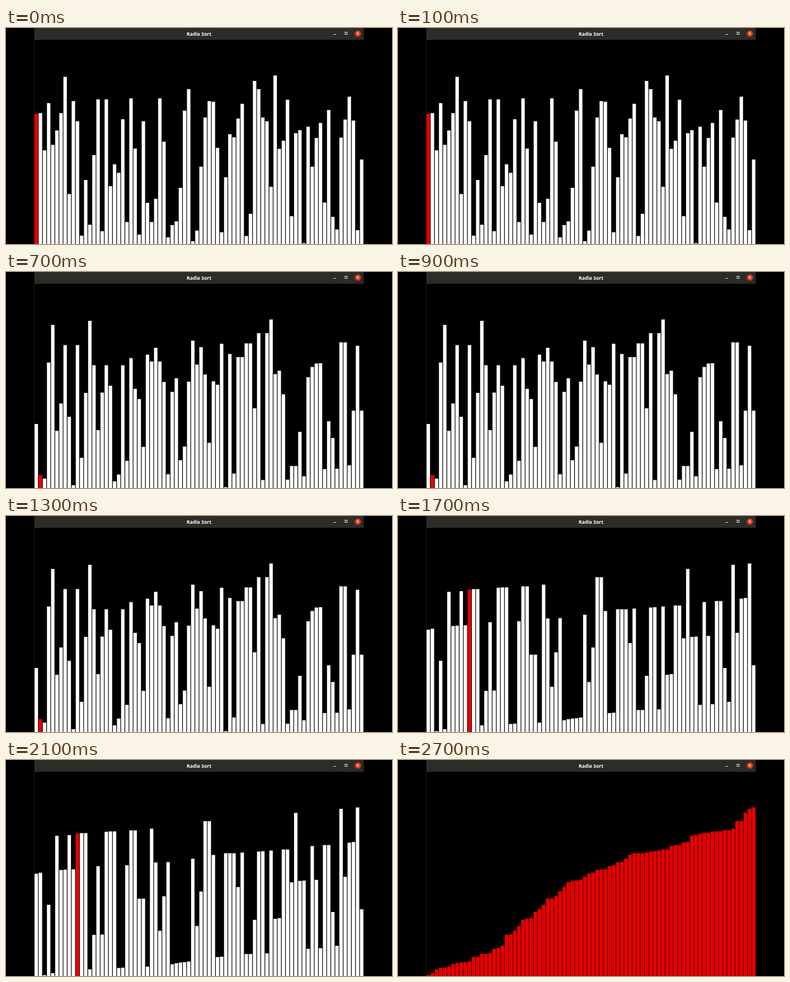
These frames come from a looping animation (690x388 px, 3.3 s). An HTML page with a canvas:

```html
<!DOCTYPE html>
<html lang="en">
<head>
<meta charset="utf-8">
<title>Radix Sort</title>
<style>
  html, body { margin: 0; width: 100%; height: 100%; overflow: hidden; background: #000; }
  canvas { display: block; }
</style>
</head>
<body>
<canvas id="stage" width="690" height="388"></canvas>
<script>
const ctx = document.getElementById('stage').getContext('2d');

const LOOP = 3300;
const SCALE = 0.6135;          // the 960 x 600 window, shrunk to the stage
const LEFT = 50.6, FLOOR = 389.6, TITLE_HEIGHT = 21.3;
const PITCH = 12 * SCALE, BAR_WIDTH = 10 * SCALE;
const WINDOW_WIDTH = 960 * SCALE;
const RED = '#e60000', DARK_RED = '#580000', WHITE = '#fffefc';

// The additive feedback generator behind rand() in the GNU C library.
function randomNumbers(count, seed = 1) {
  const warmup = 344;
  const state = [seed];
  for (let i = 1; i < warmup + count; i++) {
    if (i < 31) state[i] = (16807 * state[i - 1]) % 2147483647;
    else if (i < 34) state[i] = state[i - 31];
    else state[i] = (state[i - 3] + state[i - 31]) >>> 0;
  }
  return state.slice(warmup).map(word => word >>> 1);
}

// One stable pass of the sort, by the digit at the given place.
function sortByDigit(list, place) {
  const digit = v => Math.floor(v / place) % 10;
  return [...list].sort((a, b) => digit(a) - digit(b));
}

const values = randomNumbers(80).map(n => n % 500);
const byUnits = sortByDigit(values, 1);
const byTens = sortByDigit(byUnits, 10);
const sorted = sortByDigit(byTens, 100);

const stages = [
  { start: 0, list: values, isRed: i => i === 0 },
  { start: 700, list: byUnits, isRed: i => i === 1 },
  { start: 1700, list: byTens, isRed: i => i === 10 },
  { start: 2700, list: sorted, isRed: () => true }
];

function rect(color, x, y, w, h) {
  ctx.fillStyle = color;
  ctx.fillRect(x, y, w, h);
}

function drawBar(value, i, red) {
  const height = value * SCALE;
  const x = LEFT + 0.5 + i * PITCH, y = FLOOR - height;
  if (red) {
    const rim = (PITCH - BAR_WIDTH) / 2;
    rect(DARK_RED, x - rim, y - rim, PITCH, height + rim);
  }
  rect(red ? RED : WHITE, x, y, BAR_WIDTH, height);
}

function drawTitleBar() {
  rect('#2c2c28', LEFT, 0, WINDOW_WIDTH, TITLE_HEIGHT);

  ctx.fillStyle = '#fff';
  ctx.font = 'bold 8.6px "Open Sans", "Noto Sans", sans-serif';
  ctx.textAlign = 'center';
  ctx.fillText('Radix Sort', 345, 13.5);

  rect('#d8d8d4', 585, 11, 5, 1);
  ctx.strokeStyle = '#e8e8e4';
  ctx.lineWidth = 1;
  ctx.strokeRect(606, 7.5, 4, 4);

  ctx.fillStyle = '#dc3d1a';
  ctx.beginPath();
  ctx.arc(629, 10, 5.6, 0, Math.PI * 2);
  ctx.fill();
  ctx.strokeStyle = '#fff';
  ctx.beginPath();
  for (const d of [-2, 2]) {
    ctx.moveTo(629 - d, 8);
    ctx.lineTo(629 + d, 12);
  }
  ctx.stroke();
}

function draw(time) {
  const { list, isRed } = stages.findLast(s => time >= s.start);
  rect('#000', 0, 0, 690, 388);
  rect('#1c1c1c', 50, TITLE_HEIGHT, 1, 388);
  list.forEach((value, i) => drawBar(value, i, isRed(i)));
  drawTitleBar();
}

const begin = performance.now();
function tick() {
  draw((performance.now() - begin) % LOOP);
  requestAnimationFrame(tick);
}
tick();
</script>
</body>
</html>
```
